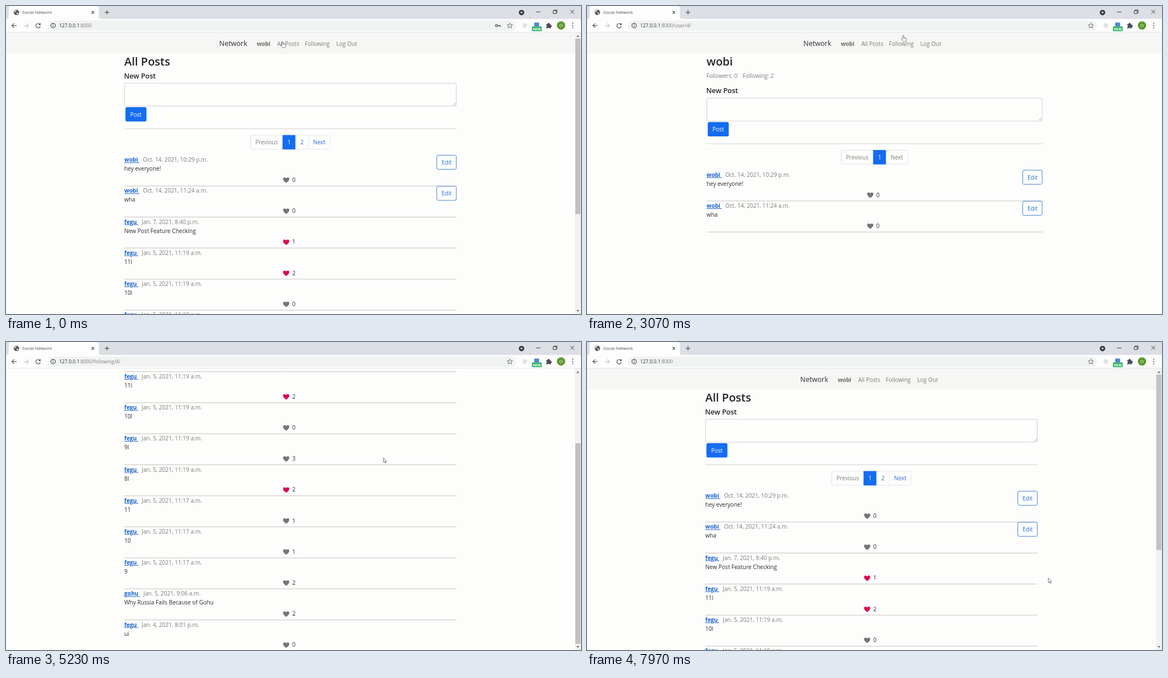
Animation, 1022 px wide and 548 px high, one loop 8000 ms. Source, as an HTML page:

```html
<!DOCTYPE html>
<html lang="en">
<head>
<meta charset="utf-8">
<title>Social Network</title>
<style>
  html, body { margin: 0; width: 100%; height: 100%; overflow: hidden; background: #fdfdfc; }
  svg { display: block; width: 1022px; height: 548px; }
  text { font: 10.05px "Open Sans", "Noto Sans", sans-serif; fill: #2a2c2f; }
  .h2 { font-size: 20px; font-weight: 600; fill: #212529; }
  .h5 { font-size: 12.5px; font-weight: 600; fill: #212529; }
  .brand { font-size: 12.5px; }
  .grey { fill: #7c7c7a; }
  .bold { font-weight: 700; fill: #6a6a69; }
  .user { font-weight: 700; fill: #1b62c9; text-decoration: underline; }
  .blue { fill: #2a6fd6; }
  .white { fill: #fff; }
  .mid { text-anchor: middle; }
  .tab { font-size: 7.6px; fill: #4a4d51; }
  .url { font-size: 8.6px; }
  .line { fill: none; stroke: #4d5156; stroke-width: 1.2; }
  [data-focus="0"] .nav0, [data-focus="1"] .nav1, [data-focus="2"] .nav2 { fill: #50504f; }
</style>
</head>
<body>
<svg id="stage" viewBox="0 0 1022 548">
  <g id="pages"></g>
  <g id="chrome"></g>
  <g id="cursor">
    <path id="arrow" d="M0 0V8.4L1.9 6.7L3.2 9.5L4.5 8.9L3.3 6.2H5.7Z" fill="#fff" stroke="#555" stroke-width=".8"/>
    <path id="hand" d="M-1 .8Q0 -.6 1 .8V4L5 5Q6 5.3 5.9 6.6L5 11H-.4L-3.6 6.9Q-3 5.6 -1 7.2ZM1 4V6M3 4.6V6.2" fill="#fff" stroke="#666" stroke-width=".8"/>
  </g>
</svg>
<script>
const $ = id => document.getElementById(id);
const text = (x, y, s, cls = '') => `<text x="${x}" y="${y}" class="${cls}">${s}</text>`;
const rect = (x, y, w, h, fill, more = '') =>
  `<rect x="${x}" y="${y}" width="${w}" height="${h}" fill="${fill}" ${more}/>`;
const path = (d, more = 'class="line"') => `<path d="${d}" ${more}/>`;
const circle = (x, y, r, more) => `<circle cx="${x}" cy="${y}" r="${r}" ${more}/>`;

const ME = 'wobi', BLUE = '#146cf0', PITCH = 55.2, MAX_SCROLL = 170.5;
const HEART = 'M0 5C-7.4 .3 -6.3 -4.4 -3 -4.7C-1.5 -4.8 -.5 -4 0 -3C.5 -4 1.5 -4.8 3 -4.7C6.3 -4.4 7.4 .3 0 5Z';

// author, date, text, likes, liked
const mine = [
  [ME, 'Oct. 14, 2021, 10:29 p.m.', 'hey everyone!', 0],
  [ME, 'Oct. 14, 2021, 11:24 a.m.', 'wha', 0],
];
const followed = [
  ['fegu', 'Jan. 7, 2021, 8:40 p.m.', 'New Post Feature Checking', 1, true],
  ['fegu', 'Jan. 5, 2021, 11:19 a.m.', '11l', 2, true],
  ['fegu', 'Jan. 5, 2021, 11:19 a.m.', '10l', 0],
  ['fegu', 'Jan. 5, 2021, 11:19 a.m.', '9l', 3],
  ['fegu', 'Jan. 5, 2021, 11:19 a.m.', '8l', 2, true],
  ['fegu', 'Jan. 5, 2021, 11:17 a.m.', '11', 1],
  ['fegu', 'Jan. 5, 2021, 11:17 a.m.', '10', 1],
  ['fegu', 'Jan. 5, 2021, 11:17 a.m.', '9', 2],
  ['gohu', 'Jan. 5, 2021, 9:06 a.m.', 'Why Russia Fails Because of Gohu', 2],
  ['fegu', 'Jan. 4, 2021, 8:01 p.m.', 'ui', 0],
];
const older = [
  ['fegu', 'Jan. 4, 2021, 8:01 p.m.', 'yu', 1],
  ['fegu', 'Jan. 4, 2021, 7:17 p.m.', 'Awsome!', 1],
  ['fegu', 'Jan. 4, 2021, 7:16 p.m.', 'Awsome!', ''],
];

function post([author, date, body, likes, liked], c, top) {
  const left = c * .416, width = c * 1.168, right = left + width;
  const edit = author === ME
    ? rect(right - 35, top + .4, 34.6, 25.2, '#fdfdfc', 'rx="2.6" stroke="#4a83cf"') +
      text(right - 17.5, top + 17, 'Edit', 'blue mid') : '';
  const heartX = likes === '' ? c + .5 : c - 7.5;
  return `<text x="${left}" y="${top + 12.2}"><tspan class="user">${author}&nbsp;</tspan><tspan dx="6.3" class="grey">${date}</tspan></text>` +
    text(left, top + 28.2, body) + edit +
    path(HEART, `transform="translate(${heartX} ${top + 44.8})" fill="${liked ? '#d90b55' : '#757575'}"`) +
    text(c + 3.2, top + 48, likes) +
    rect(left, top + PITCH - .4, width, 1, '#c3c3bd');
}

function form(left, width, top) {
  const x = left + width - 1.5, y = top + 40;
  return text(left - .6, top - 8.3, 'New Post', 'h5') +
    rect(left + .4, top + .4, width - .8, 41, '#fdfdfc', 'rx="2.5" stroke="#cfd0d2"') +
    path(`M${x - 5} ${y}l5 -5M${x - 2} ${y}l2 -2`, 'stroke="#888" stroke-width=".7"') +
    rect(left + 2, top + 43, 37.3, 25.6, BLUE, 'rx="2.8"') +
    text(left + 20.6, top + 59.9, 'Post', 'white mid');
}

function pager(c, top, count, active) {
  const cells = ['Previous', ...Array.from({ length: count }, (_, i) => i + 1), 'Next'];
  const widths = cells.map((s, i) => i === 0 ? 56.5 : s === 'Next' ? 38.5 : 23);
  const total = widths.reduce((a, b) => a + b);
  let x = c - total / 2;
  let out = rect(x, top, total, 24.8, '#fdfdfc', 'rx="2.6" stroke="#e2e4e6" stroke-width=".9"');
  cells.forEach((s, i) => {
    const on = s === active;
    const off = (i === 0 && active === 1) || (s === 'Next' && active === count);
    out += on ? rect(x, top - .4, widths[i], 25.6, BLUE) : rect(x, top, .8, 24.8, '#e2e4e6');
    out += text(x + widths[i] / 2, top + 16.2, s, 'mid ' + (on ? 'white' : off ? 'grey' : 'blue'));
    x += widths[i];
  });
  return out;
}

function scrollbar(id, thumb) {
  return rect(1011, 47, 11, 501, '#f1f1f0') +
    path('M1014 55l2.5 -3l2.5 3ZM1014 541l2.5 3l2.5 -3Z', 'fill="#6a6a6a"') +
    rect(1012, 58, 9, thumb, '#c1c1c1', `id="${id}Thumb"`);
}

function page(id, { c, title, profile, hasForm, rule, count, active, posts, thumb }) {
  const left = c * .416, width = c * 1.168;
  const nav = rect(0, 47, 1022, 38, '#f6f6f4') +
    text(c - 126.5, 71.3, 'Network', 'brand') +
    [[-59.8, ME], [-23.6, 'All Posts'], [25.6, 'Following'], [81.5, 'Log Out']]
      .map(([dx, s], i) => text(c + dx, 70.5, s, `nav${i} ${i ? 'grey' : 'bold'}`)).join('');
  return `<g id="${id}"><g id="${id}Body">` + nav +
    text(left - (title === 'Following' ? 1.2 : 0), 105.6, title, 'h2') +
    (profile ? text(left - .6, 127.8, 'Followers: 0', 'grey') + text(left + 64.2, 127.8, 'Following: 2', 'grey') : '') +
    (hasForm ? form(left, width, rule - 81.3) : '') +
    rect(left, rule - .2, width, .9, '#cfcfcd') +
    pager(c, rule + 11.8, count, active) +
    posts.map((p, i) => post(p, c, rule + 46.8 + i * PITCH)).join('') +
    '</g>' + (thumb ? scrollbar(id, thumb) : '') + '</g>';
}

$('pages').innerHTML =
  page('all', { c: 505.5, title: 'All Posts', hasForm: true, rule: 218.2, count: 2, active: 1,
    posts: [...mine, ...followed.slice(0, 4)], thumb: 312 }) +
  page('user', { c: 511, title: ME, profile: true, hasForm: true, rule: 244.8, count: 1, active: 1, posts: mine }) +
  page('follow', { c: 505.5, title: 'Following', rule: 121.2, count: 2, active: 1, posts: followed, thumb: 357 }) +
  page('older', { c: 511, title: 'Following', rule: 121.2, count: 2, active: 2, posts: older });

$('chrome').innerHTML =
  rect(0, 0, 1022, 24, '#dcdfe3') +
  path('M1 23Q5 23 5 18V4Q5 0 9 0H161Q165 0 165 4V18Q165 23 169 23Z', 'fill="#fdfdfd"') +
  rect(0, 23, 1022, 23.5, '#fdfdfd') + rect(0, 46.3, 1022, .9, '#dfe1e3') +
  `<g id="globe">${circle(18.5, 11.3, 4.8, 'fill="#565a5f"')}${path('M15 9.3q2 -2.3 4 -1.6q-.2 2 -2.5 2.4q-.3 1.6 -1.8 1.2ZM18.5 12.2q2.6 -1 3.4 .3q-.6 2 -2.6 2.4q.3 -1.6 -.8 -2.7Z', 'fill="#e9eaec"')}</g>` +
  path('M18.5 6.6A4.7 4.7 0 1 1 14.4 13.6', 'id="spinner" fill="none" stroke="#3f78c5" stroke-width="1.4"') +
  text(29, 14, 'Social Network', 'tab') +
  path('M152 9l4.6 4.6m0 -4.6l-4.6 4.6M175.5 11.3h8M179.5 7.3v8') +
  circle(916.3, 11.7, 4.8, 'fill="#33373b"') + path('M913.8 10.5h5l-2.5 3Z', 'fill="#fff"') +
  path('M942 10.5h8M972.5 8.5h5.5v5h-5.5ZM974 8.3V7h5.5v5H978M1003 6.8l7 7m0 -7l-7 7', 'fill="none" stroke="#333" stroke-width=".9"') +
  path('M18.8 34.8h-8m3.7 -4l-4 4l4 4') +
  path('M31.5 34.8h8m-3.7 -4l4 4l-4 4', 'fill="none" stroke="#bfc2c5" stroke-width="1.2"') +
  `<g id="reload">${path('M60.4 32.7A4 4 0 1 0 61 36')}${path('M61.5 30v4h-4Z', 'fill="#4d5156"')}</g>` +
  path('M53.5 31.2l7.2 7.2m0 -7.2l-7.2 7.2', 'id="stop" class="line"') +
  rect(73, 25.8, 834, 18, '#f1f3f3', 'rx="9"') +
  circle(83.8, 34.8, 4, 'class="line" stroke-width=".9"') + path('M83.8 34.2v2.8M83.8 32.3v1') +
  '<text x="94.4" y="38" class="url">127.0.0.1<tspan id="path" class="grey"></tspan></text>' +
  `<g id="key">${circle(871.8, 34.8, 1.9, 'class="line"')}${path('M873.7 34.8h5.2v2M876.8 34.8v1.8')}</g>` +
  path('M895.6 30.2l1.3 3.1l3.4 .3l-2.6 2.2l.8 3.3l-2.9 -1.8l-2.9 1.8l.8 -3.3l-2.6 -2.2l3.4 -.3Z', 'fill="none" stroke="#5f6368" stroke-width=".9"') +
  circle(922.3, 34.6, 4.2, 'fill="#dfe1e2"') +
  rect(939, 29.5, 8.5, 7, '#4a86d0') + rect(934.8, 36.3, 17.4, 8.4, '#35b56a', 'rx="1.5"') +
  '<text x="943.5" y="42.8" class="white mid" style="font-size:6px;font-weight:700">NEW</text>' +
  path('M960.4 32h2.5a1.5 1.5 0 1 1 2.8 0h2.5v2.4a1.5 1.5 0 1 1 0 2.8v2.5h-2.6a1.5 1.5 0 0 0 -2.8 0h-2.4v-2.5a1.5 1.5 0 0 0 0 -2.8Z', 'fill="#4b4f54"') +
  circle(986.5, 34.6, 7.4, 'fill="#5b9a2e"') +
  '<text x="986.5" y="37.4" class="white mid" style="font-size:7.6px">O</text>' +
  [30.8, 34.7, 38.6].map(y => circle(1007.3, y, 1, 'fill="#4d5156"')).join('');

// start time, value
const pageAt = [[0, 'all'], [1150, 'user'], [4800, 'follow'], [6400, 'older'], [7350, 'all']];
const pathAt = [[0, ''], [850, '/user/4/'], [4150, '/following/4/'], [6150, '/following/4/?page=2'], [7250, '']];
const loadAt = [[0, false], [800, true], [1350, false], [4100, true], [4950, false], [6100, true], [6700, false], [7200, true], [7550, false]];
const focusAt = [[0, ''], [750, 0], [1150, ''], [4000, 2], [4800, ''], [7150, 1], [7350, '']];
const scrollAt = [[0, 0], [4980, 0], [5200, MAX_SCROLL], [5480, MAX_SCROLL], [5720, 0]];
const cursorAt = [
  [0, 491.5, 63], [250, 491.5, 63], [600, 460, 64], [900, 460, 64], [1650, 547, 121], [2500, 551, 121],
  [3000, 562, 52], [3900, 563, 60], [4500, 760, 214], [4900, 760, 214], [5150, 671, 206], [5500, 671, 206],
  [5900, 530, 143], [6100, 530, 143], [6550, 669, 433], [6750, 669, 433], [7050, 505, 64], [7250, 505, 64], [7900, 820, 420],
];

const held = (keys, t) => keys.findLast(k => k[0] <= t)[1];
function eased(keys, t, i = 1) {
  const n = keys.findIndex(k => k[0] > t);
  if (n < 0) return keys[keys.length - 1][i];
  const a = keys[n - 1], b = keys[n], u = (t - a[0]) / (b[0] - a[0]);
  return a[i] + (b[i] - a[i]) * u * u * (3 - 2 * u);
}
const show = (id, on) => $(id).setAttribute('visibility', on ? 'visible' : 'hidden');
const move = (id, x, y) => $(id).setAttribute('transform', `translate(${x} ${y})`);

function draw(t) {
  const current = held(pageAt, t), loading = held(loadAt, t);
  for (const id of ['all', 'user', 'follow', 'older']) show(id, id === current);
  $('stage').dataset.focus = held(focusAt, t);
  $('path').textContent = ':8000' + held(pathAt, t);

  const scroll = eased(scrollAt, t);
  move('followBody', 0, -scroll);
  move('followThumb', 0, scroll / MAX_SCROLL * 122);

  show('key', t < 850);
  show('globe', !loading);
  show('reload', !loading);
  show('spinner', loading);
  show('stop', loading);
  $('spinner').setAttribute('transform', `rotate(${(t - 4570) * .325} 18.5 11.3)`);

  const x = eased(cursorAt, t, 1), y = eased(cursorAt, t, 2);
  const onNav = scroll === 0 && y > 50 && y < 81 && x > 440 && x < 632;
  const onPager = current === 'follow' && scroll === 0 && y > 132 && y < 158 && x > 491 && x < 576;
  move('cursor', x, y);
  show('hand', onNav || onPager);
  show('arrow', !(onNav || onPager));
}

const start = performance.now();
(function tick() {
  draw((performance.now() - start) % 8000);
  requestAnimationFrame(tick);
})();
</script>
</body>
</html>
```
